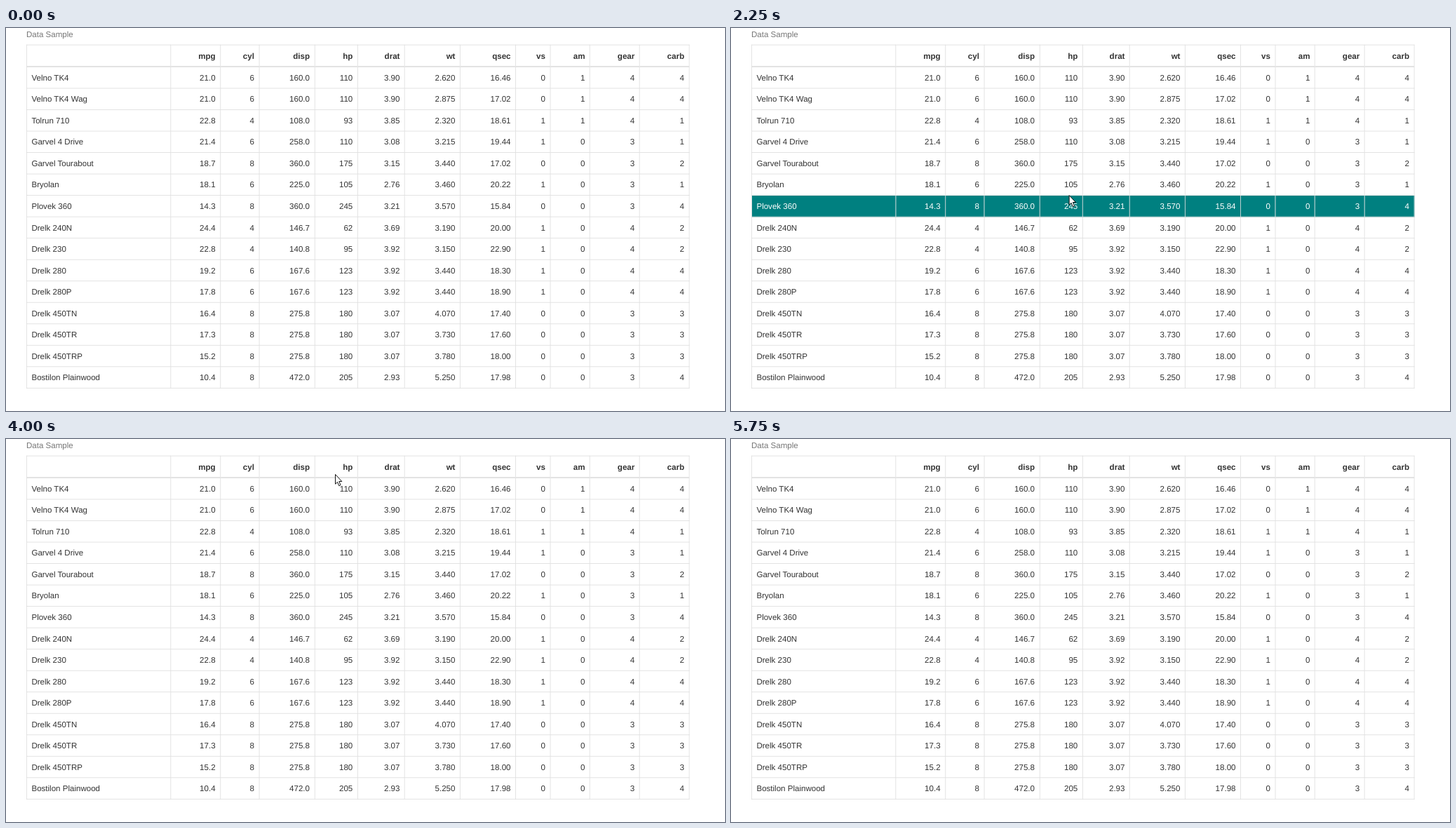
These frames come from a looping animation (1025 px wide and 546 px high, 6750 ms). An HTML page:

```html
<!DOCTYPE html>
<html lang="en">
<head>
<meta charset="utf-8">
<title>Data Sample</title>
<style>
  html, body { margin: 0; width: 100%; height: 100%; overflow: hidden; background: #fff; }
  body { position: relative; }
  table {
    position: absolute; left: 29px; top: -6px; width: 1146px;
    transform: scale(.825); transform-origin: 0 0;
    border-collapse: collapse;
    font: 14px/20px "Liberation Sans", Arial, sans-serif;
    color: #333; text-rendering: geometricPrecision;
  }
  caption { padding: 8px 0; color: #777; text-align: left; }
  th, td { padding: 8px; border: 1px solid #ddd; text-align: right; }
  th { height: 20px; border-bottom-width: 2px; }
  td:first-child { text-align: left; }
  .active { background: #008080; color: #fff; }
  svg { position: absolute; left: 0; top: 0; overflow: visible; }
</style>
</head>
<body>
<table>
  <caption>Data Sample</caption>
  <thead></thead>
  <tbody></tbody>
</table>
<svg id="pointer" width="11" height="18">
  <path d="M.5 .5V14.2L3.5 11.4L5.7 16.7L8 15.7L5.8 10.5H9.8Z" fill="#fff" stroke="#111"/>
</svg>
<script>
const columns = ["", ..."mpg cyl disp hp drat wt qsec vs am gear carb".split(" ")];

// Each line is one engine (disp hp drat carb) and its models (name, mpg wt qsec).
const engines = `
160.0 110 3.90 4 | Velno TK4, 21.0 2.620 16.46 | Velno TK4 Wag, 21.0 2.875 17.02
108.0 93 3.85 1 | Tolrun 710, 22.8 2.320 18.61
258.0 110 3.08 1 | Garvel 4 Drive, 21.4 3.215 19.44
360.0 175 3.15 2 | Garvel Tourabout, 18.7 3.440 17.02
225.0 105 2.76 1 | Bryolan, 18.1 3.460 20.22
360.0 245 3.21 4 | Plovek 360, 14.3 3.570 15.84
146.7 62 3.69 2 | Drelk 240N, 24.4 3.190 20.00
140.8 95 3.92 2 | Drelk 230, 22.8 3.150 22.90
167.6 123 3.92 4 | Drelk 280, 19.2 3.440 18.30 | Drelk 280P, 17.8 3.440 18.90
275.8 180 3.07 3 | Drelk 450TN, 16.4 4.070 17.40 | Drelk 450TR, 17.3 3.730 17.60 | Drelk 450TRP, 15.2 3.780 18.00
472.0 205 2.93 4 | Bostilon Plainwood, 10.4 5.250 17.98`.trim().split("\n");

const models = engines.flatMap(line => {
  const [engine, ...variants] = line.split(" | ");
  return variants.map(variant => [engine.split(" "), ...variant.split(", ")]);
});

function cells([[disp, hp, drat, carb], name, figures], i) {
  const [mpg, wt, qsec] = figures.split(" ");
  const cyl = disp < 150 ? 4 : disp < 260 ? 6 : 8;
  const vs = i > 1 && cyl < 8 ? 1 : 0;
  const am = i < 3 ? 1 : 0;
  const gear = (i + 1 >> 2) % 2 ? 3 : 4;
  return [name, mpg, cyl, disp, hp, drat, wt, qsec, vs, am, gear, carb];
}

const rowHtml = (tag, values) =>
  `<tr>${values.map(value => `<${tag}>${value}</${tag}>`).join("")}</tr>`;

document.querySelector("thead").innerHTML = rowHtml("th", columns);
const body = document.querySelector("tbody");
body.innerHTML = models.map((model, i) => rowHtml("td", cells(model, i))).join("");
const rows = [...body.rows];
const pointer = document.getElementById("pointer");

const LOOP = 6750, STEP = 250, START = 500, HOVER_START = 1000;
const ROWS_TOP = 55, ROW_HEIGHT = 30.53;

// Height of the pointer tip at each step: up through the table and back down.
const heights = [
  529, 499, 485, 449.5, 417, 336, 331, 238, 187, 167, 130, 87, 69, 59, 50,
  53, 129, 235.5, 451, 509, 523.5
];

const clamp = (value, low, high) => Math.min(high, Math.max(low, value));

function smooth(value, from, to) {
  const t = clamp((value - from) / (to - from), 0, 1);
  return t * t * (3 - 2 * t);
}

const pointerX = step => 511 - 42 * smooth(step, 3.5, 9) - 23 * smooth(step, 14, 18);

// The highlight trails a little behind the moving pointer.
function hoveredRow(step) {
  const y = heights[step];
  const trail = clamp((y - heights[step - 1]) * .28, -29, 29);
  return Math.floor((y - trail - ROWS_TOP) / ROW_HEIGHT);
}

function draw(now) {
  const time = now % LOOP;
  const step = Math.floor((time - START) / STEP);
  const visible = step in heights;
  const active = visible && time >= HOVER_START ? hoveredRow(step) : -1;
  pointer.style.visibility = visible ? "visible" : "hidden";
  if (visible) pointer.style.transform = `translate(${pointerX(step)}px, ${heights[step]}px)`;
  rows.forEach((row, i) => row.classList.toggle("active", i === active));
  requestAnimationFrame(draw);
}
draw(performance.now());
</script>
</body>
</html>
```
